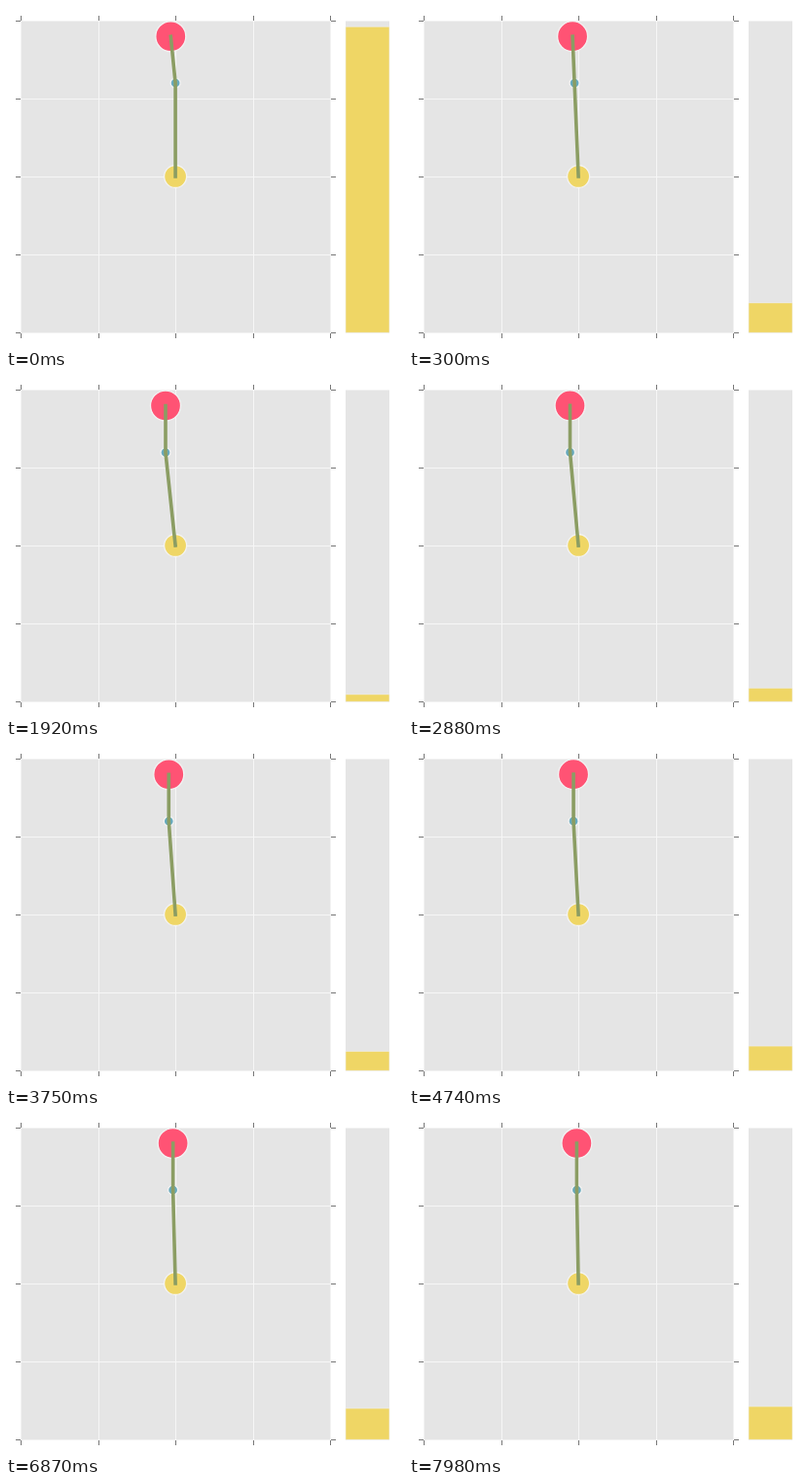
These frames come from a looping animation (408x350 px, 8 s). An HTML page:

```html
<!DOCTYPE html>
<html lang="en">
<head>
<meta charset="utf-8">
<title>Balancing double pendulum</title>
<style>
  html, body { margin: 0; width: 100%; height: 100%; overflow: hidden; background: #fff; }
  svg { display: block; width: 408px; height: 350px; }
  .panel { fill: #e5e5e5; }
  .grid { stroke: #f6f6f6; fill: none; }
  .ticks { stroke: #777; fill: none; }
  .mass { stroke: #f3f3f3; stroke-width: 1.3; }
  #bar { fill: #efd665; stroke: #eee; stroke-width: .6; }
  #rod { fill: none; stroke: #8b9d63; stroke-width: 3.6; stroke-linecap: square; stroke-linejoin: round; }
</style>
</head>
<body>
<svg viewBox="0 0 408 350">
  <rect class="panel" x="15.5" y="15.5" width="318" height="320"/>
  <rect class="panel" x="349" y="15.5" width="45" height="320"/>
  <path class="grid" id="grid"/>
  <path class="ticks" id="ticks"/>
  <rect id="bar" x="349" width="45"/>
  <circle class="mass" id="pivot" r="11.5" fill="#efd665"/>
  <circle class="mass" id="elbow" r="5" fill="#68aabd"/>
  <circle class="mass" id="tip" r="15.5" fill="#ff5374"/>
  <path id="rod"/>
</svg>
<script>
const LOOP = 8000, STEP = 30;
const LEFT = 15.5, TOP = 15.5, WIDTH = 318, HEIGHT = 320, TICK = 5;
const PIVOT = { x: 174.1, y: 175 }, UPPER = 96, LOWER = 48;

const $ = id => document.getElementById(id);
const decay = (rate, t) => Math.exp(-rate * t);

// The upper arm swings out to the left, then slowly returns upright
const elbowOffset = t => -27.8 * (decay(.35, t) - decay(1, t)) * (1 - decay(8, t));

// The lower arm starts tilted and settles in line with the elbow
const tipOffset = t => elbowOffset(t) - 4.8 * decay(2, t) * Math.cos(2.4 * t);

// A brief burst of effort, then a dip and a slow recovery
const barHeight = t => 38 + 276 * decay(11.5, t) - 75 * (decay(.37, t) - decay(1.3, t));

function place(id, p) {
  $(id).setAttribute('cx', p.x);
  $(id).setAttribute('cy', p.y);
}

function armEnd(from, x, length) {
  const dx = x - from.x;
  return { x, y: from.y - Math.sqrt(length * length - dx * dx) };
}

function drawAxes() {
  const right = LEFT + WIDTH, bottom = TOP + HEIGHT;
  let grid = '', ticks = '';
  for (let i = 0; i <= 4; i++) {
    const x = Math.floor(LEFT + WIDTH * i / 4) + .5, y = TOP + HEIGHT * i / 4;
    if (i % 4) grid += `M${x} ${TOP}V${bottom}M${LEFT} ${y}H${right}`;
    ticks += `M${x} ${TOP - .5}v-${TICK}M${x} ${bottom + .5}v${TICK}`
           + `M${LEFT - .5} ${y}h-${TICK}M${right + .5} ${y}h${TICK}`;
  }
  $('grid').setAttribute('d', grid);
  $('ticks').setAttribute('d', ticks);
}

function draw(t) {
  const elbow = armEnd(PIVOT, PIVOT.x + elbowOffset(t), UPPER);
  const tip = armEnd(elbow, PIVOT.x + tipOffset(t), LOWER);
  place('elbow', elbow);
  place('tip', tip);
  $('rod').setAttribute('d', `M${PIVOT.x} ${PIVOT.y}L${elbow.x} ${elbow.y}L${tip.x} ${tip.y}`);

  const height = barHeight(t);
  $('bar').setAttribute('y', TOP + HEIGHT - .3 - height);
  $('bar').setAttribute('height', height);
}

function tick() {
  const ms = performance.now() % LOOP;
  draw(Math.floor(ms / STEP) * STEP / 1000);
  requestAnimationFrame(tick);
}

drawAxes();
place('pivot', PIVOT);
tick();
</script>
</body>
</html>
```
